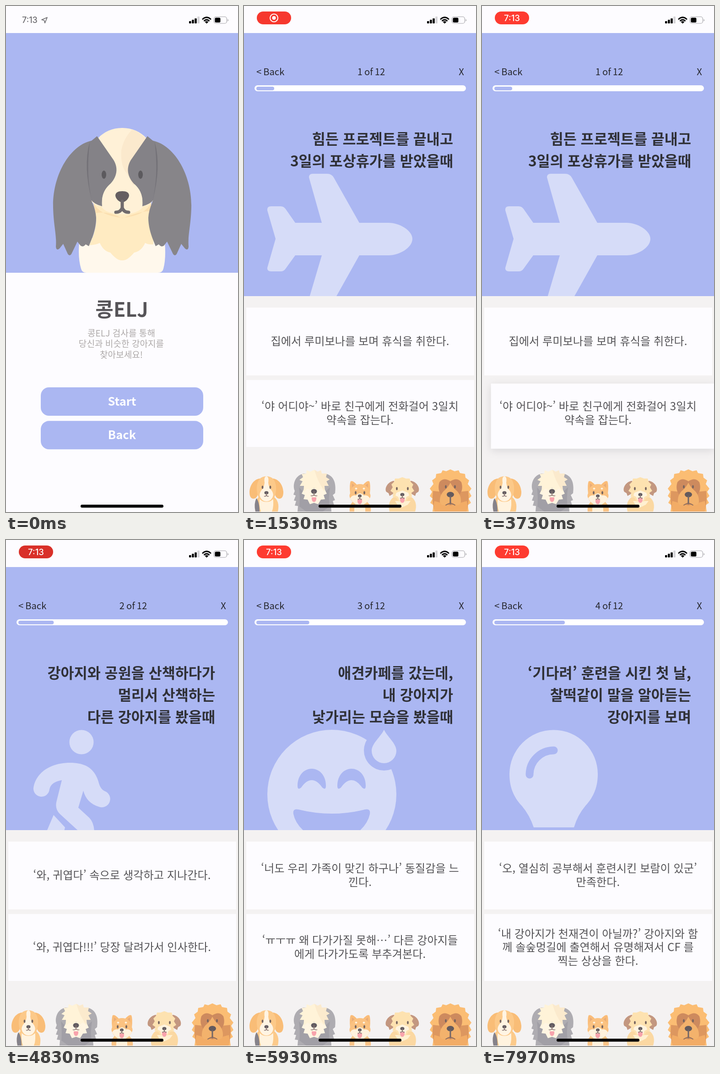
An HTML page for the animation above (8000 ms loop, 507x1104 px).

```html
<!DOCTYPE html>
<html lang="ko">
<head>
<meta charset="utf-8">
<title>Puppy quiz</title>
<style>
  html, body { margin: 0; width: 100%; height: 100%; overflow: hidden; background: #fdfcff; }
  svg { display: block; width: 100vw; height: 100vh; }
  text { font-family: "Noto Sans CJK KR", "Noto Sans CJK JP", sans-serif; white-space: pre; }
  .clock { font-family: Inter, Roboto, sans-serif; }
  .nav { word-spacing: -.08em; }
</style>
</head>
<body>
<svg id="stage" viewBox="0 0 507 1104"></svg>
<script>
const LOOP = 8000;
const BLUE = '#abb7f2', PAPER = '#fdfcff', PALE = '#d6dcf8';
const stage = document.getElementById('stage');
const $ = id => document.getElementById(id);

// Markup helpers
const path = (d, fill, more = '') => `<path d="${d}" fill="${fill}" ${more}/>`;
const line = (d, stroke, width) => path(d, 'none', `stroke="${stroke}" stroke-width="${width}" stroke-linecap="round" stroke-linejoin="round"`);
const oval = (x, y, rx, ry, fill) => `<ellipse cx="${x}" cy="${y}" rx="${rx}" ry="${ry}" fill="${fill}"/>`;
const box = (x, y, w, h, fill, r = 0, more = '') => `<rect x="${x}" y="${y}" width="${w}" height="${h}" rx="${r}" fill="${fill}" ${more}/>`;
const label = (s, x, y, size, fill, anchor = 'middle', weight = 400, more = '') =>
  `<text x="${x}" y="${y}" font-size="${size}" fill="${fill}" text-anchor="${anchor}" font-weight="${weight}" ${more}>${s.replace('<', '&lt;')}</text>`;
const navLabel = (s, x, anchor) => label(s, x, 151, 20.2, '#26272d', anchor, 500, 'class="nav"');
const both = (cx, shape) => shape + `<g transform="translate(${2 * cx} 0) scale(-1 1)">${shape}</g>`;

// Large spaniel on the start page
function spaniel() {
  const ear = 'M192 293C140 300 101 370 103 440C104 480 111 500 109 525Q110 535 117 529L125 519L135 541Q139 547 143 541L156 514L163 523Q169 527 174 520L181 524C189 505 197 485 197 462Q196 445 188 428Z';
  return path('M160 516Q157 550 164 573Q166 582 176 582H332Q342 582 344 573Q350 550 347 516L318 506H188Z', '#fff8ec')
    + path('M192 425H316Q322 470 322 520Q312 521 304 517Q296 535 280 538Q265 556 254 555Q243 556 228 538Q213 535 205 517Q197 521 182 522Q197 490 197 465Z', '#ffebc2')
    + path('M190 428Q205 458 254 462Q304 458 318 428L314 448Q300 446 254 463Q220 446 196 452Z', '#fbdfb0')
    + both(254, path(ear, '#878589'))
    + path('M177 345C182 300 210 266 254 266C298 266 326 300 331 345L321 425Q310 437 300 437Q290 454 254 454Q218 454 208 437Q190 434 187 425Z', '#fff1d7')
    + path('M276 269Q256 290 252 315Q250 350 264 365Q284 402 300 437Q322 436 331 345Q323 290 276 269Z', '#fbe9cd')
    + both(254, path('M199 284L233 333C247 352 243 374 226 390Q207 408 210 437Q192 432 186 423Q169 355 182 298Z', '#848287')
      + path('M183 297Q168 350 188 425Q174 370 183 297Z', '#737177'))
    + path('M227 389C207 406 204 437 222 448Q254 461 286 448C304 437 301 406 281 389L254 405Z', '#fff1d7')
    + both(254, oval(214, 368, 5, 9, '#5c5a5e'))
    + path('M239 413Q240 404 254 404Q268 404 269 413Q268 424 254 429Q240 424 239 413Z', '#655f61')
    + line('M254 426V440M240 450Q251 450 254 440Q257 450 268 450', '#706b6d', 7);
}

const startPage = () => box(0, 59, 507, 523, BLUE) + spaniel()
  + label('콩ELJ', 253, 678, 43, '#565458', 'middle', 900)
  + ['콩ELJ 검사를 통해', '당신과 비슷한 강아지를', '찾아보세요!']
      .map((s, i) => label(s, 252, 721 + i * 23.3, 19.1, '#aeaaa9')).join('')
  + ['Start', 'Back'].map((s, i) => box(76, 832 + i * 73.3, 355, 62, BLUE, 18)
      + label(s, 253.5, 872 + i * 73.3, 25.5, '#fff', 'middle', 700)).join('');

// Row of small dogs
const eyes = (cx, gap, y) => both(cx, oval(cx - gap, y, 1.9, 3.4, '#75645f'));
const snout = (cx, y, r = 5) => oval(cx, y, r, r * .8, '#625c61') + line(`M${cx} ${y}v${r + 2}m${-r} 1q${r - 1} 1 ${r} -3q1 4 ${r} 3`, '#8a7775', 1.6);
const tongue = (cx, y) => path(`M${cx - 5} ${y}h10v4q-1 6 -5 6t-5 -6Z`, '#f8a3ac');

function beagle() {
  return path('M25 1103Q20 1080 34 1070H64Q79 1080 74 1103Z', '#fcca8a')
    + path('M25 1103Q21 1086 27 1074Q34 1082 34 1103Z', '#85828a')
    + path('M35 1070H63Q66 1092 61 1103H37Q32 1090 35 1070Z', '#fff3df')
    + both(49, path('M35 1031C22 1032 13 1045 12 1060Q12 1075 21 1075Q30 1074 31 1060Z', '#f9bd77'))
    + path('M49 1026C36 1026 29 1035 28 1049C27 1069 34 1082 49 1082C64 1082 71 1069 70 1049C69 1035 62 1026 49 1026Z', '#fcc989')
    + path('M49 1026Q43 1027 45 1040Q44 1050 37 1058Q32 1066 36 1073Q41 1081 49 1081Q57 1081 62 1073Q66 1066 61 1058Q54 1050 53 1040Q55 1027 49 1026Z', '#fff4e3')
    + eyes(49, 8.5, 1050) + snout(49, 1062, 4.5);
}

function sheepdog() {
  return path('M130 1020C109 1025 106 1048 111 1058L108 1066L113 1068L109 1079L114 1080L111 1090L118 1091L117 1103H191L190 1091L197 1089L194 1080L199 1078L194 1067L199 1063C202 1040 196 1024 177 1020Z', '#aeacb1')
    + path('M121 1092Q123 1072 120 1050L134 1065H172L188 1050Q184 1074 187 1092L172 1103H136Z', '#a19fa6')
    + path('M132 1052L126 1064L133 1067L130 1076L139 1077L144 1087L153 1084L162 1087L168 1077L177 1076L174 1067L181 1064L175 1052Z', '#fff5e2')
    + path('M153 1012L145 1016L137 1013L136 1020L126 1021L129 1028L121 1034L128 1037L122 1047L131 1047L130 1060L139 1053L147 1057L153 1051L160 1057L168 1053L177 1060L176 1047L185 1047L180 1037L187 1033L179 1028L181 1020L170 1020L168 1013L161 1016Z', '#fff3d8')
    + path('M154 1012L161 1016L168 1013L170 1020L181 1020L179 1028L187 1033L180 1037L185 1047L176 1047L175 1057Q160 1036 154 1012Z', '#fbeacd')
    + tongue(153, 1072) + snout(153, 1059, 6.5);
}

function shiba() {
  return path('M231 1103Q229 1087 240 1080H266Q279 1087 277 1103Z', '#fbc486')
    + path('M241 1103Q240 1082 253 1082T265 1103Z', '#fff2dd')
    + both(253.5, path('M232 1064Q230 1044 233 1037Q238 1034 248 1046L242 1058Z', '#fabc78') + path('M236 1051V1042Q239 1043 243 1048Z', '#e8ac79'))
    + path('M253 1043Q234 1044 232 1063Q229 1069 232 1074Q238 1088 253 1089Q268 1088 275 1074Q278 1069 275 1063Q273 1044 253 1043Z', '#fbc281')
    + both(253.5, path('M253.5 1063Q247 1065 245 1068Q237 1066 232 1074Q239 1088 253.5 1089Z', '#fff2dd') + oval(245, 1053, 2.5, 2, '#fff2dd'))
    + eyes(253.5, 9.5, 1062) + tongue(253, 1077) + snout(253, 1069, 4);
}

function terrier() {
  return path('M318 1103Q313 1083 326 1072H367Q380 1083 374 1103Z', '#fbd8a2')
    + path('M330 1080L335 1088L346 1094L358 1088L364 1080Z', '#fff0d1')
    + both(346, path('M328 1036C315 1037 306 1052 311 1060L316 1063L318 1069L325 1065L331 1056Z', '#c39780'))
    + path('M346 1028L338 1031L330 1031L328 1038L322 1044L325 1050L320 1058L326 1062L325 1071L333 1073L338 1081L346 1079L354 1081L359 1073L367 1071L366 1062L372 1058L367 1050L370 1044L364 1038L362 1031L354 1031Z', '#fde2b0')
    + path('M346 1057L333 1062L331 1068L337 1071L340 1079L346 1077L352 1079L355 1071L361 1068L359 1062Z', '#fff4df')
    + eyes(346, 12, 1053) + tongue(346, 1074) + snout(346, 1066, 4.5);
}

function mastiff() {
  return path('M451 1011L442 1015L434 1013L431 1019L420 1021L419 1029L411 1035L414 1043L406 1053L411 1060L406 1069L412 1075L407 1084L414 1089L412 1103H491L489 1089L496 1084L491 1075L497 1069L492 1060L497 1053L489 1043L492 1035L484 1029L483 1021L472 1019L469 1013L460 1015Z', '#fbbd73')
    + path('M451 1062L413 1058Q410 1084 417 1103H486Q493 1084 490 1058Z', '#dd975f')
    + path('M451 1090L416 1080Q413 1092 417 1103H486Q490 1092 487 1080Z', '#f2ac66')
    + path('M451 1037Q436 1027 427 1039Q422 1055 431 1066H471Q480 1055 475 1039Q466 1027 451 1037Z', '#cd8a5e')
    + path('M451 1040Q446 1050 439 1056Q427 1066 428 1082Q431 1092 440 1088L451 1082L462 1088Q471 1092 474 1082Q475 1066 463 1056Q456 1050 451 1040Z', '#f3b26c')
    + eyes(451, 10, 1049) + oval(451, 1066, 8, 6, '#635a5d')
    + line('M451 1070V1086', '#716567', 3)
    + line('M441 1089Q451 1082 461 1089', '#8a6e62', 1.8);
}

// Pale pictures behind each question
const plane = path('M142 374Q142 366 150 366H182Q191 366 196 374L252 473H316C340 473 368 490 368 508C368 527 340 544 316 544H252L197 642H141L170 544H112L91 573Q87 579 80 579H59Q50 579 51 571L69 508L51 446Q50 437 59 437H80Q87 437 91 443L112 473H170Z', PALE);

const walker = oval(165, 441, 26.5, 26.5, PALE)
  + path('M60 541C64 510 95 486 140 486C178 486 194 502 202 527Q206 544 216 548A17.5 17.5 0 0 1 203 582Q176 574 169 547L158 584L182 606Q193 617 193 640H164L118 598Q107 588 110 572L122 524Q98 528 95 544A17.5 17.5 0 0 1 60 541ZM104 600L129 627L126 640H87Z', PALE);

const smile = oval(192, 555, 141, 141, PALE)
  + oval(306, 459, 44, 44, BLUE)
  + path('M306 414C299 429 279 444 279 460A27 27 0 0 0 333 460C333 444 313 429 306 414Z', PALE)
  + both(191.5, path('M117 536C117 514 131 499 148 499S179 514 179 536Q179 547 171 540Q160 524 148 524T125 540Q117 547 117 536Z', BLUE))
  + path('M108 598Q106 585 119 588Q192 606 264 588Q277 585 275 598Q271 618 252 635H131Q112 618 108 598Z', BLUE);

const bulb = path('M113 627Q104 600 87 580C68 560 60 537 60 511A96.5 96.5 0 0 1 253 511C253 537 245 560 226 580Q209 600 201 627Z', PALE)
  + line('M104 512A53 53 0 0 1 157 459', BLUE, 17);

const questions = [
  { icon: plane, ask: ['힘든 프로젝트를 끝내고', '3일의 포상휴가를 받았을때'],
    answers: [['집에서 루미보나를 보며 휴식을 취한다.'], ['‘야 어디야~’ 바로 친구에게 전화걸어 3일치', '약속을 잡는다.']] },
  { icon: walker, ask: ['강아지와 공원을 산책하다가', '멀리서 산책하는', '다른 강아지를 봤을때'],
    answers: [['‘와, 귀엽다’ 속으로 생각하고 지나간다.'], ['‘와, 귀엽다!!!’ 당장 달려가서 인사한다.']] },
  { icon: smile, ask: ['애견카페를 갔는데,', '내 강아지가', '낯가리는 모습을 봤을때'],
    answers: [['‘너도 우리 가족이 맞긴 하구나’ 동질감을 느', '낀다.'], ['‘ㅠㅜㅠ 왜 다가가질 못해⋯’ 다른 강아지들', '에게 다가가도록 부추겨본다.']] },
  { icon: bulb, ask: ['‘기다려’ 훈련을 시킨 첫 날,', '찰떡같이 말을 알아듣는', '강아지를 보며'],
    answers: [['‘오, 열심히 공부해서 훈련시킨 보람이 있군’', '만족한다.'], ['‘내 강아지가 천재견이 아닐까?’ 강아지와 함', '께 솔숲멍길에 출연해서 유명해져서 CF 를', '찍는 상상을 한다.']] }
];

const questionText = ({ icon, ask, answers }, n) => `<g id="q${n}"><g clip-path="url(#hero)">${icon}</g>`
  + box(27, 176, 460 * (n + 1) / 12 + .7, 8, BLUE, 4)
  + navLabel(`${n + 1} of 12`, 278, 'middle')
  + ask.map((s, i) => label(s, 457, 302 + i * 48, 31.6, '#303137', 'end', 700)).join('')
  + answers.map((rows, k) => rows.map((s, i) =>
      label(s, 253.5, 740 + k * 157 + (i - (rows.length - 1) / 2) * 29.5, 24.2, '#555457', 'middle', 500)).join('')).join('')
  + '</g>';

const quizPage = () => box(0, 59, 507, 574, BLUE) + box(0, 633, 507, 471, '#f4f2f2')
  + navLabel('< Back', 27, 'start') + navLabel('X', 475, 'middle')
  + box(23, 173, 462, 13, '#fff', 6.5)
  + box(5, 658, 498, 148, PAPER)
  + box(5, 816, 498, 146, PAPER, 0, 'id="card"')
  + questions.map(questionText).join('')
  + `<g clip-path="url(#floor)">${beagle() + sheepdog() + shiba() + terrier() + mastiff()}</g>`;

const statusBar = () => box(0, 0, 507, 59, PAPER)
  + `<g id="plainClock">${label('7:13', 35, 37, 18, '#555458', 'start', 500, 'class="clock"')}${line('M78 30L90 25L85 37L83.5 31.5Z', '#555458', 1.7)}</g>`
  + `<g id="pill">${box(28, 12, 75, 28, '#ff3b30', 14, 'id="pillFill"')}
     <g id="recordMark"><circle cx="65.5" cy="26" r="8.5" fill="none" stroke="#fff" stroke-width="2"/>${oval(65.5, 26, 4, 4, '#fff')}</g>
     ${label('7:13', 65.5, 33, 18.5, '#fff', 'middle', 500, 'class="clock" id="pillClock"')}</g>`
  + [5, 8, 11, 15].map((h, i) => box(400 + i * 6.1, 38 - h, 4.6, h, i < 3 ? '#000' : '#d5d4d8', 1)).join('')
  + line('M430 28.5Q438.5 21 447 28.5M433.5 32Q438.5 28 443.5 32', '#000', 3)
  + path('M434.5 34.5Q438.5 31.5 442.5 34.5L438.5 38.5Z', '#000')
  + box(454.5, 23.5, 28, 14.5, 'none', 4.5, 'stroke="#a5a4a9" stroke-width="1.2"')
  + box(456.5, 25.5, 12, 10.5, '#000', 2.5) + path('M484.5 28.5Q488 31 484.5 33.5Z', '#a5a4a9');

stage.innerHTML = `<defs><clipPath id="hero">${box(0, 59, 507, 574, '#000')}</clipPath>
  <clipPath id="floor">${box(0, 960, 507, 143, '#000')}</clipPath></defs>`
  + box(0, 0, 507, 1104, PAPER)
  + `<g id="start">${startPage()}</g><g id="quiz">${quizPage()}</g>`
  + statusBar() + box(163, 1088, 181, 6.5, '#000', 3.25);

// Page changes: start page, then one entry per question
const pageTimes = [900, 3950, 5700, 7740];
const ramp = (t, from, to) => {
  const p = Math.min(1, Math.max(0, (t - from) / (to - from)));
  return p * p * (3 - 2 * p);
};
const show = (id, on) => $(id).setAttribute('display', on ? 'inline' : 'none');
const fade = (id, value) => $(id).setAttribute('opacity', value);

function render(t) {
  const page = pageTimes.filter(time => t >= time).length;
  show('start', page === 0);
  show('quiz', page > 0);
  questions.forEach((_, i) => show('q' + i, page === i + 1));

  const press = page > 0 && page < 4 ? ramp(t, pageTimes[page] - 300, pageTimes[page] - 210) : 0;
  const card = $('card');
  const rect = { x: 5 + 15 * press, y: 816 + 8 * press, width: 498 - 11 * press, height: 146 - 4 * press };
  for (const key in rect) card.setAttribute(key, rect[key]);
  card.style.filter = press ? `drop-shadow(0 4px 9px rgba(60,60,75,${.15 * press}))` : 'none';

  const glow = .5 + .5 * Math.cos((t - 1850) / 2000 * 2 * Math.PI);
  const mix = (low, high) => Math.round(low + (high - low) * glow);
  $('pillFill').setAttribute('fill', `rgb(${mix(217, 255)},${mix(48, 59)},${mix(41, 48)})`);
  fade('plainClock', .85 * (1 - ramp(t, 0, 200)));
  fade('pill', ramp(t, 60, 450));
  fade('recordMark', 1 - ramp(t, 3000, 3180));
  fade('pillClock', ramp(t, 3150, 3350));
}

const begin = performance.now();
function tick() {
  render((performance.now() - begin) % LOOP);
  requestAnimationFrame(tick);
}
tick();
</script>
</body>
</html>
```
